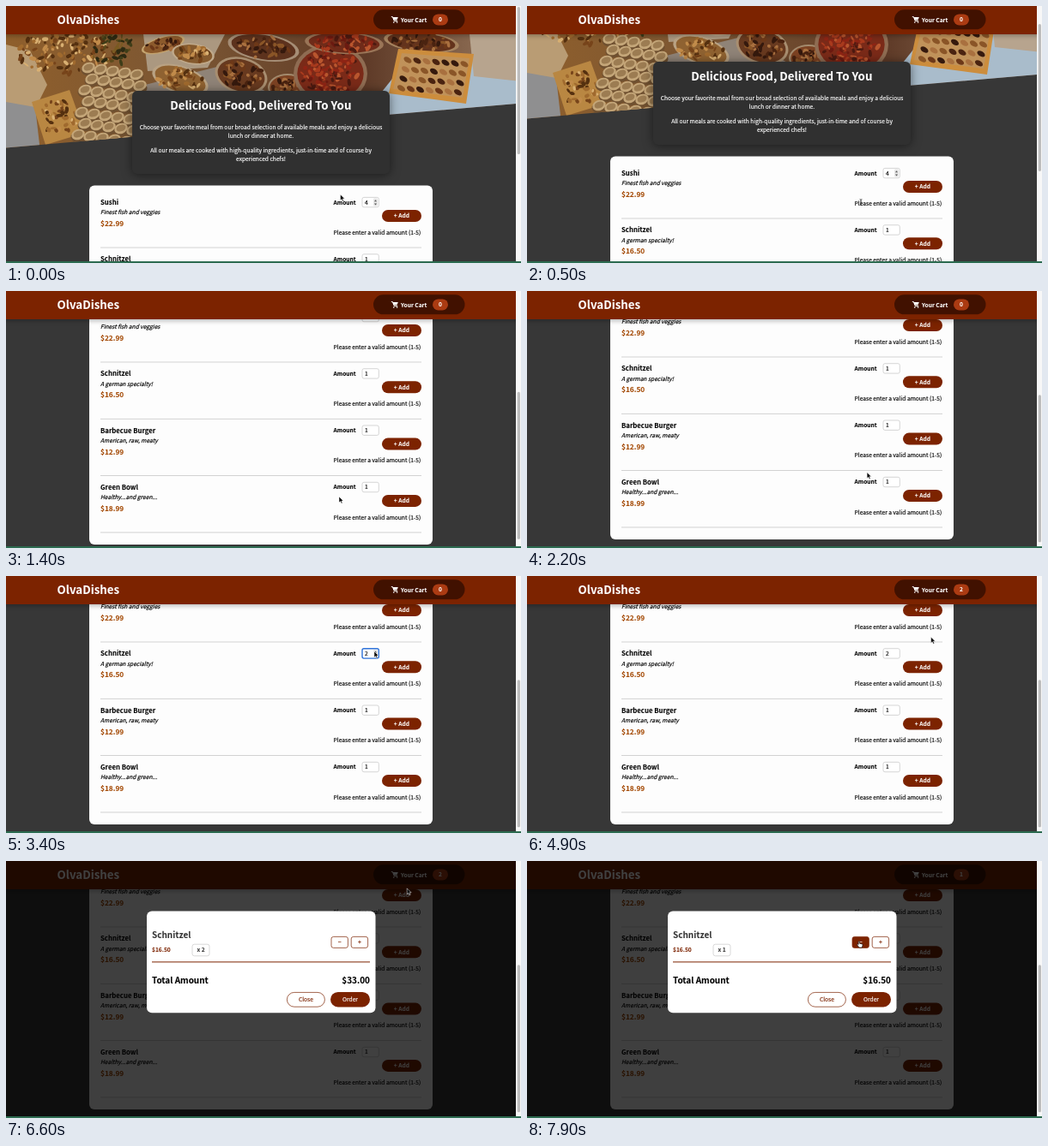
Animation, 600 px wide and 300 px high, one loop 8000 ms. Source, as an HTML page:

```html
<!DOCTYPE html>
<html lang="en">
<head>
<meta charset="utf-8">
<title>Meal ordering demo</title>
<style>
html, body { margin: 0; height: 100%; overflow: hidden; background: #373737; }
svg { display: block; width: 100vw; height: 100vh; }
text { font: 6.67px "Noto Sans CJK JP", "Noto Sans CJK", "Noto Sans", sans-serif; white-space: pre; stroke-width: .16; }
.b { font-weight: 700; stroke-width: .08; }
.i { font-style: italic; }
.h1 { font-size: 13.32px; }
.h2 { font-size: 9.98px; }
.h3 { font-size: 7.8px; }
.price { font-size: 8.31px; }
.mid { text-anchor: middle; }
.end { text-anchor: end; }
.bar { filter: drop-shadow(0 1px 3px rgba(0,0,0,.35)); }
.lift { filter: drop-shadow(0 1px 6px rgba(0,0,0,.5)); }
</style>
</head>
<body>
<svg id="stage" viewBox="0 0 600 300" preserveAspectRatio="none"></svg>
<script>
const LOOP = 8000, STEP = 100;
const BROWN = '#7c2300', DARK = '#411100', BADGE = '#ab3b12', PRICE = '#a44a06';
const MAX_SCROLL = 205, ROW = 66.3;

const text = (x, y, str, cls = '', fill = '#000', id = '') =>
  `<text x="${x}" y="${y}" class="${cls}" fill="${fill}" stroke="${fill}" id="${id}">${str}</text>`;
const rect = (x, y, w, h, r, fill, more = '') =>
  `<rect x="${x}" y="${y}" width="${w}" height="${h}" rx="${r}" fill="${fill}" ${more}/>`;
const oval = (x, y, rx, ry, fill, turn = 0) =>
  `<ellipse cx="${x}" cy="${y}" rx="${rx}" ry="${ry}" fill="${fill}" transform="rotate(${turn} ${x} ${y})"/>`;
const poly = (points, fill) => `<polygon points="${points}" fill="${fill}"/>`;
const border = color => `stroke="${color}" stroke-width=".7"`;

let seed = 7;
const rand = () => (seed = seed * 16807 % 2147483647) / 2147483647;
const pick = list => list[Math.floor(rand() * list.length)];

// Small pieces of food scattered over an oval
function scatter(x, y, rx, ry, colors, count) {
  let out = '';
  for (let i = 0; i < count; i++) {
    const a = rand() * 6.28, d = Math.sqrt(rand());
    out += oval(x + rx * d * Math.cos(a), y + ry * d * Math.sin(a), 1.5 + rand() * 3, 1 + rand() * 1.5, pick(colors), rand() * 180);
  }
  return out;
}

const dish = (x, y, rx, ry, rim, base, colors, count, turn = 0) =>
  oval(x, y, rx, ry, rim, turn) + oval(x, y, rx * .9, ry * .88, base, turn)
  + scatter(x, y, rx * .78, ry * .76, colors, count);

function buffet() {
  const meat = ['#4a2310', '#6d3818', '#8a5527', '#a9703f', '#35190d'];
  const fruit = ['#8e2414', '#a93a1d', '#6b1a10', '#b9562e', '#4c1a10'];
  const bread = ['#a06a2e', '#c18b4a', '#77441a', '#55300f', '#d9b072'];
  const green = ['#3f3d18', '#5b4a1c', '#2e2a12', '#7a5a22'];
  let out = rect(0, 0, 600, 170, 0, 'url(#wood)')
    + poly('0,45 28,52 48,92 30,128 0,138', '#b99c74')
    + poly('0,112 34,118 40,170 0,170', '#8f8f90')
    + poly('160,33 255,33 235,72 165,76', '#ab9880')
    + poly('150,95 250,70 330,115 310,150 150,160', '#8f8377')
    + poly('430,110 470,60 600,54 600,120 430,134', '#a9bccb')
    + poly('540,33 600,33 600,88 545,82', '#b7a48e');
  out += scatter(70, 55, 60, 24, bread, 130)
    + scatter(124, 50, 26, 18, green, 50)
    + poly('30,112 74,98 92,148 46,162', '#b98742') + scatter(60, 130, 22, 20, bread, 45)
    + dish(183, 45, 26, 9, '#c3a36e', '#8c5a2c', meat, 28, -16)
    + dish(218, 56, 25, 12, '#c0a98a', '#855a2e', bread, 30, 8)
    + dish(203, 86, 34, 16, '#b9a283', '#8f6231', bread, 45, 18)
    + dish(300, 48, 42, 16, '#a58d75', '#5d321d', meat, 55, 9)
    + dish(274, 81, 31, 21, '#a88e70', '#67391f', meat, 60, 15)
    + dish(328, 95, 23, 16, '#a38a6d', '#7c4222', meat, 36)
    + dish(378, 79, 43, 35, '#8f6c52', '#7a2a18', fruit, 120)
    + dish(394, 43, 46, 13, '#9a7557', '#6f2b19', fruit, 55, 3)
    + dish(484, 42, 44, 12, '#a5835f', '#63331c', meat, 45, 6);
  out += poly('457,50 545,56 536,114 446,102', '#cc8d3d') + poly('461,55 540,61 532,107 451,97', '#c0925a');
  for (let r = 0; r < 4; r++) for (let c = 0; c < 7; c++)
    out += oval(468 + c * 11 - r * 2.5, 63 + r * 11 + c * .8, 5, 3, pick(meat), 32);
  for (let r = 0; r < 7; r++) for (let c = 0; c < 5; c++) {
    const x = 96 + c * 14 - r * 2 + (r % 2) * 6, y = 72 + r * 13 + c * 2;
    out += oval(x, y + 3, 8.5, 6.5, '#6f5030') + oval(x, y, 8, 6, '#c4a679', -20) + oval(x, y - .5, 5.6, 3.8, '#9c7c52', -20);
  }
  return `<g clip-path="url(#slant)">${out}</g>`;
}

function meal([name, note, price], i) {
  const id = 'meal' + i;
  return `<g transform="translate(0 ${i * ROW})">`
    + text(110, 232, name, 'b h3') + text(110, 243.4, note, 'i') + text(110, 257, price, 'b price', PRICE)
    + text(381.5, 231.6, 'Amount', 'b')
    + rect(415, 223.4, 19.3, 11.4, 2, '#fff', border('#c4c4c4') + ` id="${id}box"`)
    + text(418, 231.6, i ? 1 : 4, '', '#000', id + 'num')
    + `<g id="${id}spin">${rect(428, 224.6, 5, 9, 1, '#e6e6e6')}<path d="M429 228.2l1.5-2 1.5 2zM429 230.4l1.5 2 1.5-2z" fill="#555"/></g>`
    + rect(438, 238, 46, 14, 7, BROWN, `id="${id}add"`) + text(461, 247.4, '+ Add', 'b mid', '#fff')
    + text(381.6, 266.8, 'Please enter a valid amount (1-5)')
    + rect(110, 281.6, 374, .8, 0, '#c8c8c8') + '</g>';
}

const meals = [
  ['Sushi', 'Finest fish and veggies', '$22.99'],
  ['Schnitzel', 'A german specialty!', '$16.50'],
  ['Barbecue Burger', 'American, raw, meaty', '$12.99'],
  ['Green Bowl', 'Healthy...and green...', '$18.99']
];

const summary = rect(147, 99, 300, 97, 6, '#303030', 'class="lift"')
  + text(296.8, 121, 'Delicious Food, Delivered To You', 'b h1 mid', '#fff')
  + [[144.4, 'Choose your favorite meal from our broad selection of available meals and enjoy a delicious'],
     [154.2, 'lunch or dinner at home.'],
     [170.6, 'All our meals are cooked with high-quality ingredients, just-in-time and of course by'],
     [180.6, 'experienced chefs!']].map(([y, s]) => text(297, y, s, 'mid', '#fff')).join('');

const cartIcon = `<g transform="translate(448.8 12)" fill="#fff">
  <path d="M0 .6h1.6l2 5h3.8" fill="none" stroke="#fff"/><path d="M1.6 1H8L6.6 4.6H3z"/>
  <circle cx="3" cy="7.1" r=".8"/><circle cx="6.8" cy="7.1" r=".8"/></g>`;

const header = rect(-9, -9, 618, 42, 0, BROWN, 'class="bar"')
  + text(59.5, 21.4, 'OlvaDishes', 'b h1', '#fff')
  + rect(428, 4.3, 106.5, 23, 11.5, DARK, 'id="cart"') + cartIcon
  + text(460, 18.6, 'Your Cart', 'b', '#fff')
  + rect(497, 9.4, 18, 13, 6.5, BADGE) + text(506, 18.4, 0, 'b mid', '#fff', 'count');

const modal = rect(164, 58.6, 266.5, 118.6, 6, '#fff')
  + text(170, 90.4, 'Schnitzel', 'b h2', '#363636') + text(170, 106.2, '$16.50', 'b', BROWN)
  + rect(217, 97.2, 20, 13.6, 2.5, '#fff', border('#c8c8c8')) + text(227, 106.3, 'x 2', 'b mid', '#363636', 'qty')
  + rect(379, 88.4, 19.4, 13, 2.5, '#fff', border(BROWN) + ' id="minus"') + text(388.7, 97.3, '−', 'b mid', BROWN, 'minusSign')
  + rect(402.2, 88.4, 19.4, 13, 2.5, '#fff', border(BROWN)) + text(411.9, 97.3, '+', 'b mid', BROWN)
  + rect(170, 117.4, 254, 1, 0, BROWN)
  + text(170, 143.4, 'Total Amount', 'b h2') + text(424, 143.4, '$33.00', 'b h2 end', '#000', 'total')
  + rect(327.4, 153.4, 44, 16.8, 8.4, '#fff', border(BROWN)) + text(349.4, 164.2, 'Close', 'mid', BROWN)
  + rect(378, 153, 46, 17.4, 8.7, BROWN) + text(401, 164.2, 'Order', 'mid', '#fff');

const pointers = {
  arrow: '<path d="M0 0v7l1.6-1.5 1.2 2.6 1.2-.6-1.2-2.5h2.2z" fill="#000" stroke="#fff" stroke-width=".5"/>',
  beam: '<path d="M-1.4-3.5q1.4 0 1.4 1v5q0 1-1.4 1M1.4-3.5q-1.4 0-1.4 1v5q0 1 1.4 1" fill="none" stroke="#333" stroke-width=".7"/>',
  hand: '<path d="M-.8-2q.8-.8 1.4 0v2.3l3 .7q.6.3.4 1.2L3.4 5H0L-2.4 1.8q0-1 1-.7l.6.5z" fill="#fff" stroke="#000" stroke-width=".6"/>'
};

document.getElementById('stage').innerHTML = `
  <defs>
    <linearGradient id="wood"><stop stop-color="#8f5f2c"/><stop offset=".35" stop-color="#7b5633"/>
      <stop offset=".7" stop-color="#5f3b28"/><stop offset="1" stop-color="#9a7b60"/></linearGradient>
    <clipPath id="slant"><polygon points="0,0 600,0 600,113.5 0,165.5"/></clipPath>
  </defs>
  ${rect(0, 0, 600, 300, 0, '#373737')}
  <g id="page">${buffet()}${summary}${rect(97, 209.5, 400, 285.5, 6, '#fdfdfd')}${meals.map(meal).join('')}</g>
  ${header}
  ${rect(0, 0, 595, 300, 0, '#000', 'opacity=".75" id="shade"')}
  <g id="modal">${modal}</g>
  ${rect(594, 0, 6, 300, 0, '#f7f7f7')}${rect(595.7, 0, 3.3, 172, 1.6, '#bdbdbd', 'id="thumb"')}
  ${rect(0, 298, 600, 2, 0, '#2c6b50')}
  <g id="pointer">${Object.entries(pointers).map(([k, p]) => `<g id="${k}">${p}</g>`).join('')}</g>`;

const $ = id => document.getElementById(id);
const set = (id, attrs) => { for (const k in attrs) $(id).setAttribute(k, attrs[k]); };
const show = (id, on) => set(id, { display: on ? 'inline' : 'none' });
const smooth = p => p * p * (3 - 2 * p);
const linear = p => p;

// Value at time t along keys [time, value]
function along(keys, t, ease) {
  const n = keys.findIndex(k => k[0] > t);
  if (n < 0) return keys[keys.length - 1][1];
  const [t0, a] = keys[n - 1], [t1, b] = keys[n];
  return a + (b - a) * ease((t - t0) / (t1 - t0));
}

// CSS ease-out: cubic-bezier(0, 0, .58, 1)
function easeOut(x) {
  let lo = 0, hi = 1;
  for (let i = 0; i < 20; i++) {
    const u = (lo + hi) / 2;
    if (1.74 * u * u * (1 - u) + u ** 3 < x) lo = u; else hi = u;
  }
  return smooth(lo);
}

const scrollKeys = [[0, 0], [200, 7], [500, 34], [800, 71], [1000, 100], [1200, 153], [1400, 199], [1800, MAX_SCROLL]];
const xKeys = [[0, 389.5], [500, 389], [1000, 391], [1400, 388], [2000, 388], [2700, 429], [3600, 429], [4100, 460], [4600, 460], [5300, 487], [6400, 487], [7100, 387]];
const yKeys = [[0, 220], [500, 229], [1000, 225], [1400, 240], [2000, 240], [2700, 97], [3000, 88], [3600, 88], [4100, 107], [4600, 107], [5300, 16], [6400, 16], [7100, 96]];

function pointerAt(t) {
  if (t >= 400 && t < 1300) return 'beam';
  const onButton = t >= 3900 && t < 4700 || t >= 5200 && t <= 5700 || t >= 7000;
  return onButton ? 'hand' : 'arrow';
}

function draw(t) {
  const scroll = Math.round(along(scrollKeys, t, linear));
  set('page', { transform: `translate(0 ${-scroll})` });
  set('thumb', { y: 1 + scroll * .587 });

  const focus = t >= 3100 && t < 4400;
  set('meal1box', { stroke: focus ? '#2f73d9' : '#c4c4c4', 'stroke-width': focus ? 1.4 : .7 });
  $('meal1num').textContent = t < 3200 ? 1 : 2;
  for (let i = 0; i < 4; i++)
    show(`meal${i}spin`, i === 0 && t < 900 || i === 1 && t >= 2700 && t < 3800);
  set('meal1add', { fill: t >= 3900 && t < 4700 ? '#581700' : BROWN });
  set('cart', { fill: t >= 5200 && t <= 5700 ? '#260a00' : DARK });

  const removed = t >= 7400, hover = t >= 7000;
  $('count').textContent = t < 4400 ? 0 : removed ? 1 : 2;
  $('qty').textContent = removed ? 'x 1' : 'x 2';
  $('total').textContent = removed ? '$16.50' : '$33.00';
  const sign = hover ? '#fff' : BROWN;
  set('minus', { fill: hover ? BROWN : '#fff' });
  set('minusSign', { fill: sign, stroke: sign });

  const open = t > 5700, p = easeOut(Math.min(1, Math.max(0, (t - 5700) / 300)));
  show('shade', open);
  show('modal', open);
  set('modal', { opacity: p, transform: `translate(0 ${-19.9 * (1 - p)})` });

  const kind = pointerAt(t);
  for (const k in pointers) show(k, k === kind);
  set('pointer', { transform: `translate(${along(xKeys, t, smooth)} ${along(yKeys, t, smooth)})` });
}

const start = performance.now();
function tick() {
  const t = (performance.now() - start) % LOOP;
  draw(Math.floor(t / STEP) * STEP);
  requestAnimationFrame(tick);
}
tick();
</script>
</body>
</html>
```
